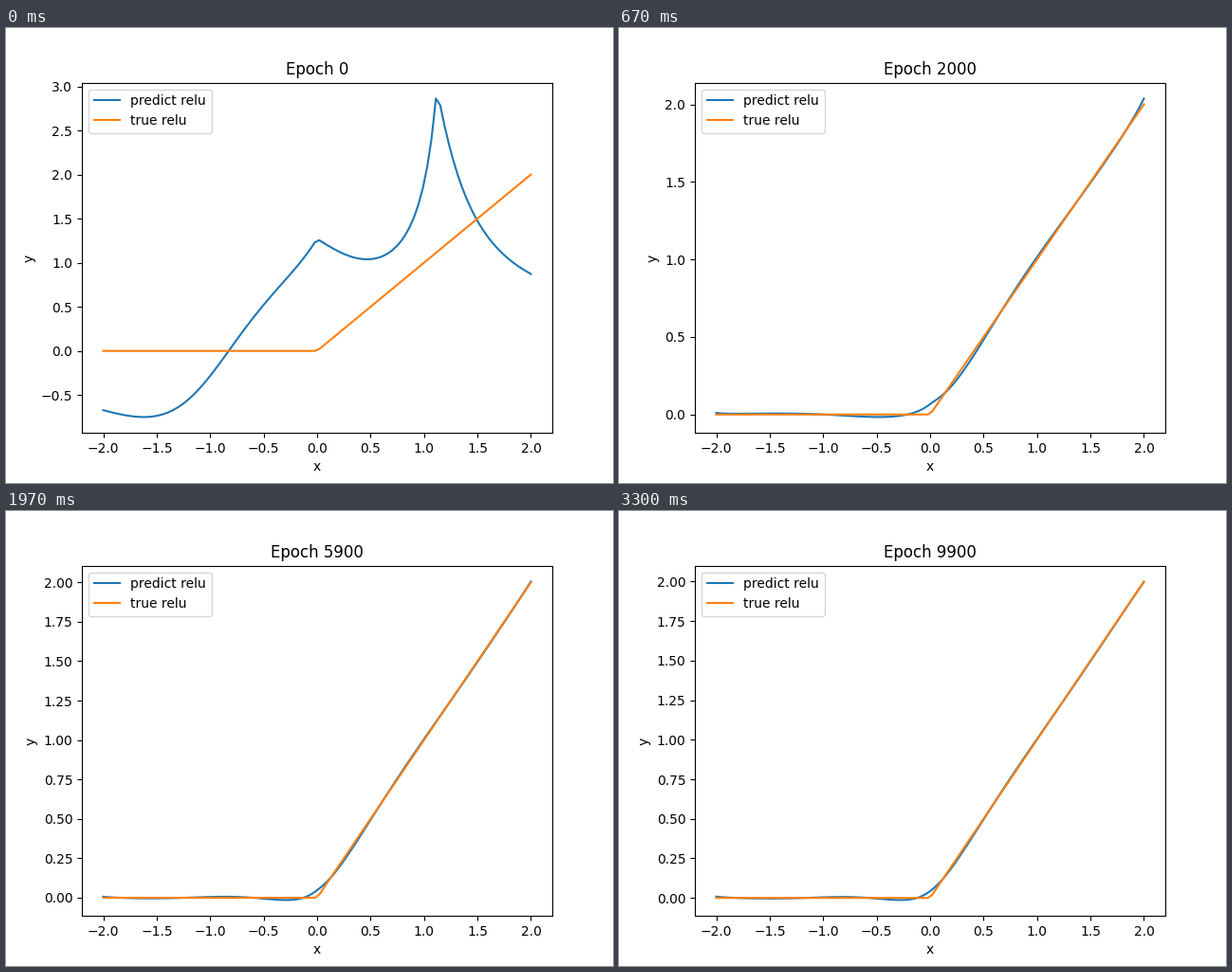
Recreate the animation shown at these times as a matplotlib script. Size 640x480 px, loop 3330 ms.

```python
import numpy as np
import matplotlib.pyplot as plt
from matplotlib.animation import FuncAnimation

TICK_MS, LOOP_MS = 30, 3330
STEPS_PER_MS = 0.03         # one training step shown every 100/3 ms
EPOCHS_PER_STEP = 100
ROUGH_AT, GOOD_AT = 13, 28  # steps at which the fit reaches each stage

x = np.linspace(-2, 2, 100)
relu = np.maximum(x, 0)

# Untrained rational unit P(x) / (1 + |Q(x)|), where Q is zero at 0 and KINK.
KINK = 1.12
KEY_POINTS = [(-2, -.672), (-1.62, -.75), (-1, -.285), (-.83, 0), (-.5, .52),
              (-.25, .86), (-.02, 1.225), (.02, 1.26), (.25, 1.112),
              (.46, 1.047), (.8, 1.26), (1, 1.89), (1.111, 2.87),
              (1.1515, 2.78), (1.25, 2.27), (1.5, 1.475), (2, .872)]


def rational_terms(at):
    """Columns of P (degree 5) and of |Q| (degree 4)."""
    top = np.vander(at, 6, increasing=True)
    bottom = np.abs(at * (KINK - at))[:, None] * np.vander(at, 3, increasing=True)
    return top, bottom


def fit_rational(points, at):
    px, py = np.array(points).T
    top, bottom = rational_terms(px)
    system = np.hstack([top, -py[:, None] * bottom])
    coef = np.linalg.lstsq(system, py, rcond=None)[0]
    top, bottom = rational_terms(at)
    return top @ coef[:6] / (1 + bottom @ coef[6:])


# Stages of the fit error: height at 0, then (left, right) pairs of
# ripple stretch, ripple damping and error at the ends.
ROUGH = np.array([.072, 2.8, 1.12, 13, 1.3, .02, .069])
GOOD = np.array([.063, 1.2, 1.2, 9, 5.5, .004, .029])
BEST = np.array([.040, 1.0, 1.0, 7, 7, .0075, -.006])


def near_relu(stage):
    """ReLU plus a ripple that dies away on both sides of 0."""
    height, *pairs = stage
    stretch, damping, end = (np.where(x < 0, left, right)
                             for left, right in zip(pairs[::2], pairs[1::2]))
    u = np.abs(x) / stretch
    ripple = height * np.cos(7.07 * u ** .71) / (1 + damping * u)
    return relu + ripple + end * (np.abs(x) / 2) ** 18


def decay(n, start, end, tau):
    """Exponential weight falling from 1 at start to 0 at end."""
    last = np.exp(-(end - start) / tau)
    return (np.exp(-(n - start) / tau) - last) / (1 - last)


untrained = fit_rational(KEY_POINTS, x)
rough = near_relu(ROUGH)


def predict(n):
    if n < ROUGH_AT:
        tau = 2.8 - .6 * np.abs(x)      # the ends settle first
        return rough + (untrained - rough) * decay(n, 0, ROUGH_AT, tau)
    if n < GOOD_AT:
        return near_relu(GOOD + (ROUGH - GOOD) * decay(n, ROUGH_AT, GOOD_AT, 10))
    return near_relu(BEST + (GOOD - BEST) * np.exp(-(n - GOOD_AT) / 27))


fig, ax = plt.subplots(figsize=(6.4, 4.8), dpi=100)
fit, = ax.plot(x, untrained, label="predict relu")
ax.plot(x, relu, label="true relu")
ax.set_xlabel("x")
ax.set_ylabel("y")
ax.legend(loc="upper left")
title = ax.set_title("Epoch 0")


def draw(tick):
    # The last step that begins within this tick, on a 10 ms clock.
    n = int((tick * TICK_MS + 25) * STEPS_PER_MS)
    fit.set_ydata(predict(n))
    ax.relim()
    ax.autoscale_view()
    title.set_text(f"Epoch {n * EPOCHS_PER_STEP}")
    return fit, title


anim = FuncAnimation(fig, draw, frames=LOOP_MS // TICK_MS, interval=TICK_MS,
                     repeat=True, repeat_delay=0)
plt.show()
```
